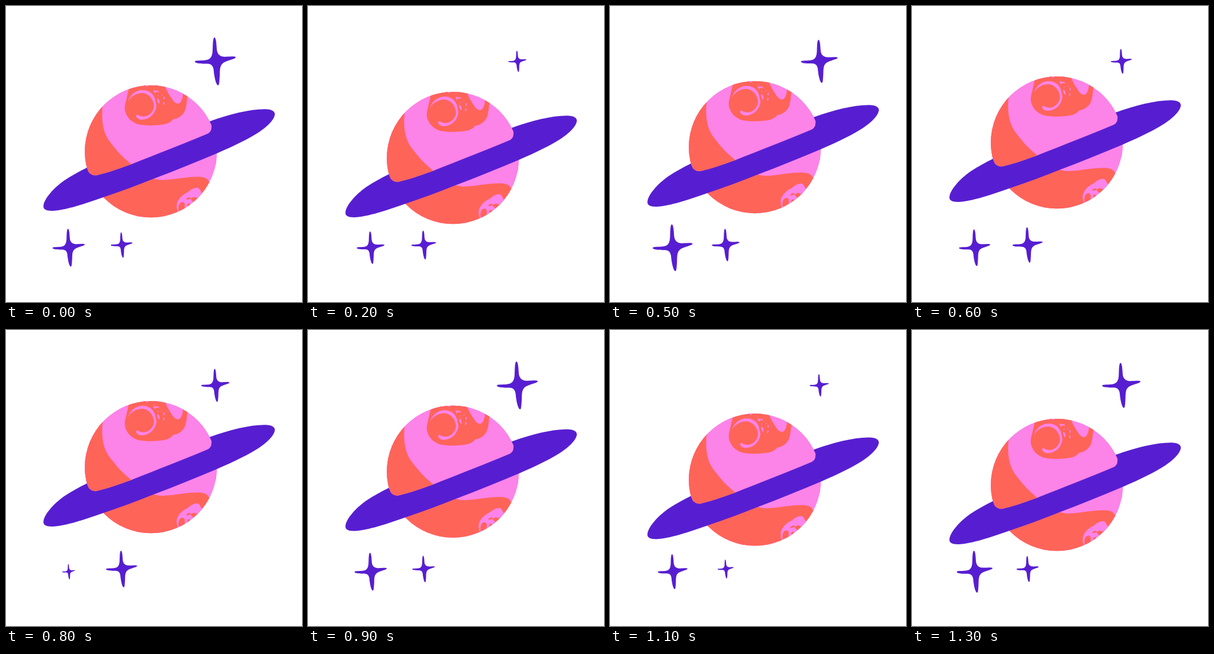
These frames come from a looping animation (500 px wide and 500 px high, 1400 ms). An HTML page with a canvas:

```html
<!DOCTYPE html>
<html lang="en">
<head>
<meta charset="utf-8">
<title>Ringed planet</title>
<style>
  html, body { margin: 0; width: 100%; height: 100%; overflow: hidden; background: #fff; }
  canvas { display: block; width: 500px; height: 500px; }
</style>
</head>
<body>
<canvas id="stage" width="500" height="500"></canvas>
<script>
const ctx = document.getElementById('stage').getContext('2d');
const PURPLE = '#571ed1', PINK = '#fc83e8', RED = '#ff6459';
const LOOP = 1400, STEP = 100;

const globe = new Path2D();
globe.arc(244.8, 245.7, 111.6, 0, Math.PI * 2);

const ring = new Path2D(`M63.3 337 C65 325 80 308 98 295 C112 286 124 279 137 273
  L345 194.5 C378 183 412 174 438 174.3 C449 174.5 455 178 454 184
  C451 198 428 215 400 228.5 C385 236 371 242.5 356 249
  C322 263 286 278 250 291.5 C222 303 194 313 166 322.5
  C136 333 100 345.5 78 346 C67 346 62.5 343 63.3 337 Z`);

// upper half of the globe that sits in front of the ring
const front = new Path2D(`M120 120 H370 V195 H348 L347 206 Q347 212 341 215.5
  C300 233 255 250 210 268 C190 275 170 282 153 286
  Q145 287 140 281 Q137 276 136 270 L120 270 Z`);

const lowland = new Path2D(`M164 165 C161 182 162 200 167 214 C171 224 175 229 180 235
  C188 246 198 256 210 266 L245 290 C255 294 262 294.5 272 293.5
  C290 292 308 288 326 288.5 C337 289 342 292 344 300
  L340 370 H120 V165 Z`);

const crater = new Path2D(`M207 125 L207 141 C206 147 204 153 203 159 C201 166 200 172 201 177
  C204 189 213 197 224 200 C239 203 258 202 271 199 C277 197 280 194 283 191
  C288 191 292 188 295 186 C300 182 303 177 304 170 C306 163 305 158 307 151
  L304 143 L299 147 C299 155 296 164 291 165 C286 165 282 160 279 155
  C275 149 272 144 268 134 L266 125 Z`);

const swirl = new Path2D(`M206 162 C209 150 219 142 231 142 C243 142 250 150 252 158
  C252 162 254 165 254 169 C253 180 245 189 234 191.5 C228 193 222 191 220 187
  C219 184 221 183 223 184 C229 188 237 187 241 184 C247 180 250 174 250 168
  C249 157 241 148 231 147 C220 147 210 153 206 162 Z`);

const flecks = new Path2D(`M249 139 L252 143 L257 143 L259 146 L254 145 L252 148 L250 145 L248 144 L251 143 Z
  M255 157 C258 155 260 160 259 165 C257 165 256 161 255 157 Z
  M266 154 L268 153 L268 158 L266 157 Z M266 162 L268 163 L267 167 L265 166 Z
  M262 151 L264 149 L264 151 Z M256 150 L258 152 L256 153 Z M236 134 H240 V136 H236 Z`);

const basin = new Path2D(`M292 350 C288 344 287 336 290 330 C294 322 301 317 308 314
  C313 309 320 306 325 307.5 C328 309 328 313 332 317 L330 325 L305 350 Z`);

const islands = new Path2D(`M293 350 C290 343 291 335 295 332 C299 330 302 332 302 336 C301 341 303 343 306 342 L300 352 Z
  M304 327 C306 323 310 322 313 325 C310 326 307 327 304 327 Z
  M312 326 C316 321 321 323 322 325 L326 322 L318 334 C318 330 314 330 312 326 Z
  M306 335 L310 333 L311 338 L307 341 Z
  M355 261 L358 260 V268 L354 267 Z M327 291 L334 291 L336 293 Z`);

// four-pointed sparkle, 81 units tall
const sparkle = new Path2D(`M-1.5 -40.5 C1.5 -40 2 -29 2.5 -21 C3 -13 7 -9 13 -8
  C20 -7 33 -9.5 34.5 -7 C35 -4 20 -2 13 3 C7 8 8 16 7.5 25
  C7 31 7 40 5 40.5 C1 40.5 -2 24 -2.8 14 C-4 7 -7 4.5 -13 4
  C-20 4 -34 4 -34.5 .5 C-34 -2.5 -22 -.5 -14 -2.5 C-7 -4 -5 -10 -4.5 -18
  C-4 -26 -4.5 -39 -1.5 -40.5 Z`);

const bob = [[0, 0], [100, 8], [200, 11], [400, 2], [600, -15], [800, -14], [1000, 2], [1300, 16]];

// sparkle heights, one per step
const stars = [
  { x: 353.5, y: 93.5, h: [81, 52, 36, 42, 81, 73, 42, 35, 56, 81, 62, 38, 36, 76] },
  { x: 105.8, y: 408.3, h: [64, 73, 55, 35, 64, 79, 62, 46, 26, 64, 83, 59, 45, 71] },
  { x: 195.3, y: 403.7, h: [43, 46, 49, 49, 49, 55, 60, 63, 62, 45, 27, 32, 38, 44] }
];

// smooth curve through [time, value] keys
function curve(keys, t) {
  const last = keys.length - 1;
  let i = 0;
  while (i < last - 1 && t >= keys[i + 1][0]) i++;
  const slope = k => {
    const a = keys[Math.max(k - 1, 0)], b = keys[Math.min(k + 1, last)];
    return (b[1] - a[1]) / (b[0] - a[0]);
  };
  const [t0, v0] = keys[i], [t1, v1] = keys[i + 1];
  const d = t1 - t0, u = (t - t0) / d, w = 1 - u;
  return v0 * w * w * (1 + 2 * u) + v1 * u * u * (3 - 2 * u)
    + d * u * w * (slope(i) * w - slope(i + 1) * u);
}

function fill(path, color) {
  ctx.fillStyle = color;
  ctx.fill(path);
}

function drawGlobe() {
  fill(globe, PINK);
  ctx.save();
  ctx.clip(globe);
  fill(lowland, RED);
  fill(crater, RED);
  fill(swirl, PINK);
  fill(flecks, PINK);
  fill(basin, PINK);
  fill(islands, RED);
  ctx.restore();
}

function drawPlanet(dy) {
  ctx.save();
  ctx.translate(0, dy);
  drawGlobe();
  fill(ring, PURPLE);
  ctx.clip(front);
  drawGlobe();
  ctx.restore();
}

function drawStar({ x, y, h }, step) {
  const s = h[step] / 81;
  ctx.save();
  ctx.translate(x, y);
  ctx.scale(s, s);
  fill(sparkle, PURPLE);
  ctx.restore();
}

function draw(now) {
  const step = Math.floor((now % LOOP) / STEP);
  ctx.fillStyle = '#fff';
  ctx.fillRect(0, 0, 500, 500);
  drawPlanet(curve(bob, step * STEP));
  stars.forEach(star => drawStar(star, step));
}

const start = performance.now();
function tick() {
  draw(performance.now() - start);
  requestAnimationFrame(tick);
}
tick();
</script>
</body>
</html>
```
